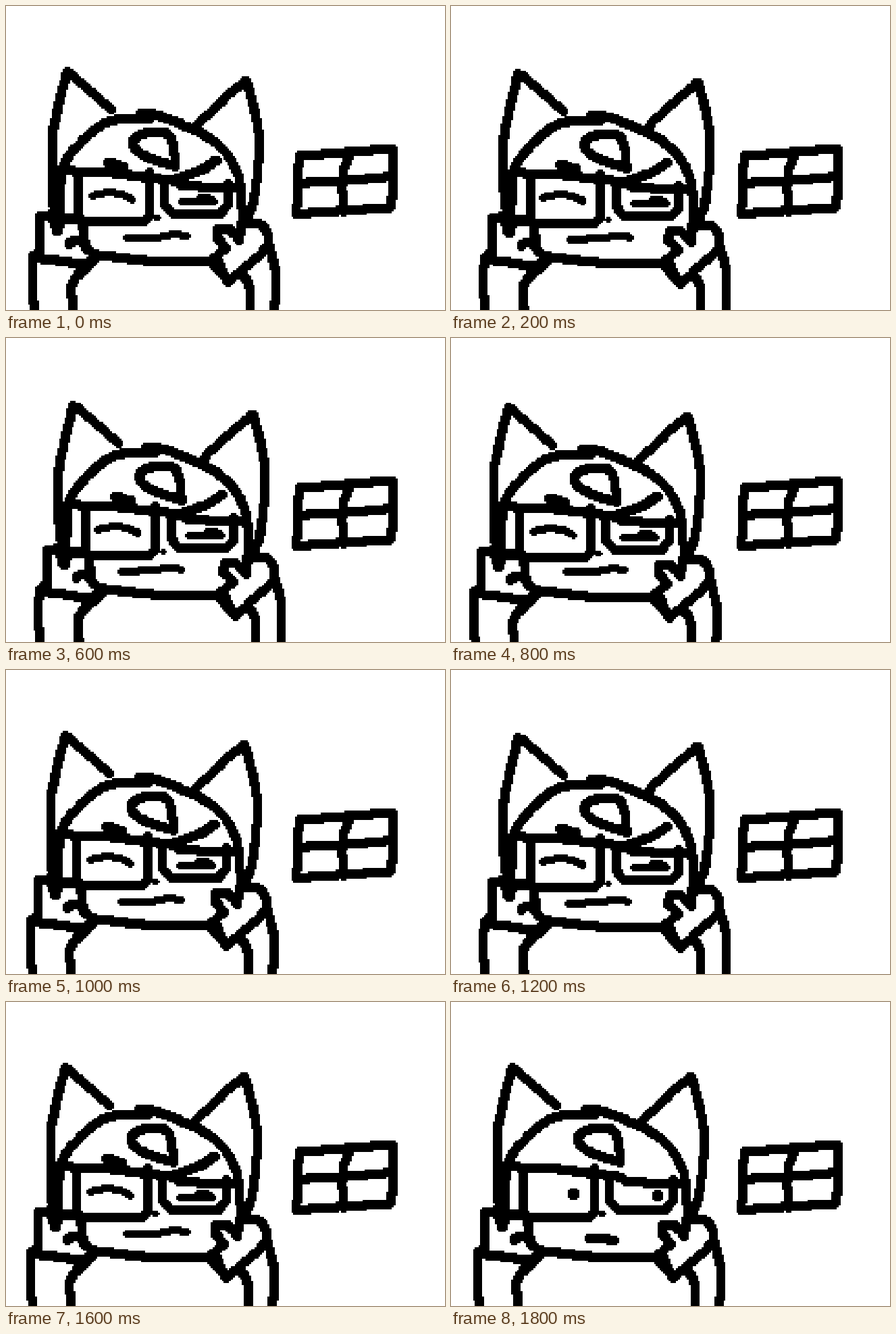
An HTML page with a canvas for the animation above (2.5 s loop, 650 by 450 pixels).

```html
<!DOCTYPE html>
<html lang="en">
<head>
<meta charset="utf-8">
<title>Sleepy cat at the window</title>
<style>
  html, body { margin: 0; width: 100%; height: 100%; overflow: hidden; background: #fff; }
  canvas { display: block; width: 650px; height: 450px; image-rendering: pixelated; }
</style>
</head>
<body>
<canvas id="stage" width="240" height="160"></canvas>
<script>
const ctx = document.getElementById("stage").getContext("2d");
const COLS = 240, ROWS = 160;
const CELL_W = 650 / COLS, CELL_H = 450 / ROWS;
const LOOP = 2500, STEP = 100, AWAKE = 18;
const THICK = 5, THIN = 4;

let shift = { x: 0, y: 0 };

// Square brush with its corners cut off, in whole cells.
function stamp(x, y, size) {
  const left = Math.floor(x - size / 2 + 0.5), top = Math.floor(y - size / 2 + 0.5);
  ctx.fillRect(left + 1, top, size - 2, size);
  ctx.fillRect(left, top + 1, size, size - 2);
}

// Points are in stage pixels; the brush moves at most one cell at a time.
function stroke(size, points) {
  const cells = points.map(([x, y]) => [x / CELL_W + shift.x, y / CELL_H + shift.y]);
  for (let i = 1; i < cells.length; i++) {
    const [x0, y0] = cells[i - 1], [x1, y1] = cells[i];
    const n = Math.max(1, Math.ceil(Math.max(Math.abs(x1 - x0), Math.abs(y1 - y0))));
    for (let k = 0; k <= n; k++) {
      stamp(x0 + (x1 - x0) * k / n, y0 + (y1 - y0) * k / n, size);
    }
  }
}

// Catmull-Rom spline through a few key points.
function smooth(keys) {
  const at = i => keys[Math.max(0, Math.min(keys.length - 1, i))];
  const points = [];
  for (let i = 0; i < keys.length - 1; i++) {
    for (let t = 0; t < 1; t += 0.125) {
      points.push([0, 1].map(axis => {
        const [a, b, c, d] = [-1, 0, 1, 2].map(k => at(i + k)[axis]);
        return b + t * (c - a + t * (2 * a - 5 * b + 4 * c - d + t * (3 * (b - c) + d - a))) / 2;
      }));
    }
  }
  return [...points, at(keys.length)];
}

const line = (...points) => stroke(THICK, points);
const curve = (...keys) => stroke(THICK, smooth(keys));
const thinCurve = (...keys) => stroke(THIN, smooth(keys));
const dot = (x, y, size) => stroke(size, [[x, y], [x, y]]);

function lens(left, right, top, bottom, corner) {
  line([left, top], [left, bottom - corner], [left + corner, bottom],
    [right - corner, bottom], [right, bottom - corner], [right, top]);
}

function drawWindow() {
  line([434, 222], [574, 211], [571, 298], [430, 308], [434, 222]);
  curve([509, 220], [499, 250], [499, 304]);
  line([438, 262], [500, 259], [563, 253]);
}

function drawHead() {
  line([156, 153], [97, 101], [90, 98]);
  curve([90, 98], [76, 155], [68, 205], [70, 294]);
  line([278, 180], [330, 131], [356, 110]);
  curve([356, 110], [368, 155], [375, 205], [368, 280], [359, 311]);
  curve([82, 242], [102, 211], [150, 172], [212, 166]);
  curve([198, 159], [232, 164], [310, 202], [344, 252], [350, 322]);
  line([82, 244], [78, 332]);
  curve([133, 368], [222, 378], [304, 378]);
  curve([251, 237], [206, 222], [187, 200], [215, 186], [243, 194], [251, 237]);
}

function drawGlasses() {
  line([82, 244], [155, 247], [245, 258], [262, 266], [345, 270]);
  lens(107, 212, 246, 318, 8);
  line([78, 312], [107, 316]);
  lens(235, 329, 262, 309, 14);
  stroke(3, [[221, 314], [225, 314]]);
}

function drawHands() {
  line([40, 371], [51, 360], [51, 311], [68, 309], [75, 333], [84, 315], [112, 316],
    [118, 358], [133, 370]);
  curve([94, 352], [103, 347], [115, 351]);
  line([40, 372], [112, 382], [132, 376]);
  line([112, 382], [108, 394]);
  curve([132, 376], [104, 402], [97, 420], [101, 460]);
  curve([40, 372], [38, 412], [43, 460]);

  curve([348, 324], [374, 322], [387, 337], [387, 358]);
  line([387, 358], [330, 408], [303, 378], [327, 358], [312, 344], [314, 331], [331, 330],
    [346, 347], [348, 322]);
  line([313, 376], [326, 402]);
  curve([390, 357], [399, 395], [397, 460]);
  curve([350, 397], [360, 415], [360, 460]);
}

function drawSleepingFace(step) {
  line([151, 231], [176, 239]);
  curve([312, 228], [290, 242], [252, 256]);
  thinCurve([126, 281], [145, 277], [168, 278], [186, 286]);
  thinCurve([260, 289], [310, 289]);
  thinCurve([288, 284], [307, 286]);
  shift = mouthShift(step);
  thinCurve([178, 344], [225, 342], [247, 338], [266, 341]);
}

function drawAwakeFace() {
  dot(182, 285, 6);
  dot(305, 287, 6);
  line([204, 350], [242, 352]);
}

// Shifts are counted in cells.
const REST = { x: 0, y: 0 }, LEFT = { x: -1, y: 0 };
const LOW = { x: -2, y: 2 }, RIGHT = { x: 3.5, y: 1 };

// Beats of three steps; the first beat swings right before it dips.
function headShift(step) {
  if (step === 0 || step === AWAKE) return REST;
  const beat = (step - 1) % 3;
  if (beat === 0) return LEFT;
  return (beat === 1) === (step <= 3) ? RIGHT : LOW;
}

// The mouth drifts slowly sideways and follows half of the head's bob.
function mouthShift(step) {
  const drift = Math.cos((step - 8) / AWAKE * 2 * Math.PI);
  return { x: -1.2 - 1.7 * drift, y: headShift(step).y / 2 };
}

function draw(step) {
  ctx.fillStyle = "#fff";
  ctx.fillRect(0, 0, COLS, ROWS);
  ctx.fillStyle = "#000";
  shift = REST;
  drawWindow();
  shift = headShift(step);
  drawHead();
  drawGlasses();
  drawHands();
  if (step === AWAKE) drawAwakeFace();
  else drawSleepingFace(step);
}

function tick() {
  const time = performance.now() % LOOP;
  draw(Math.min(AWAKE, Math.floor(time / STEP)));
  requestAnimationFrame(tick);
}
tick();
</script>
</body>
</html>
```
